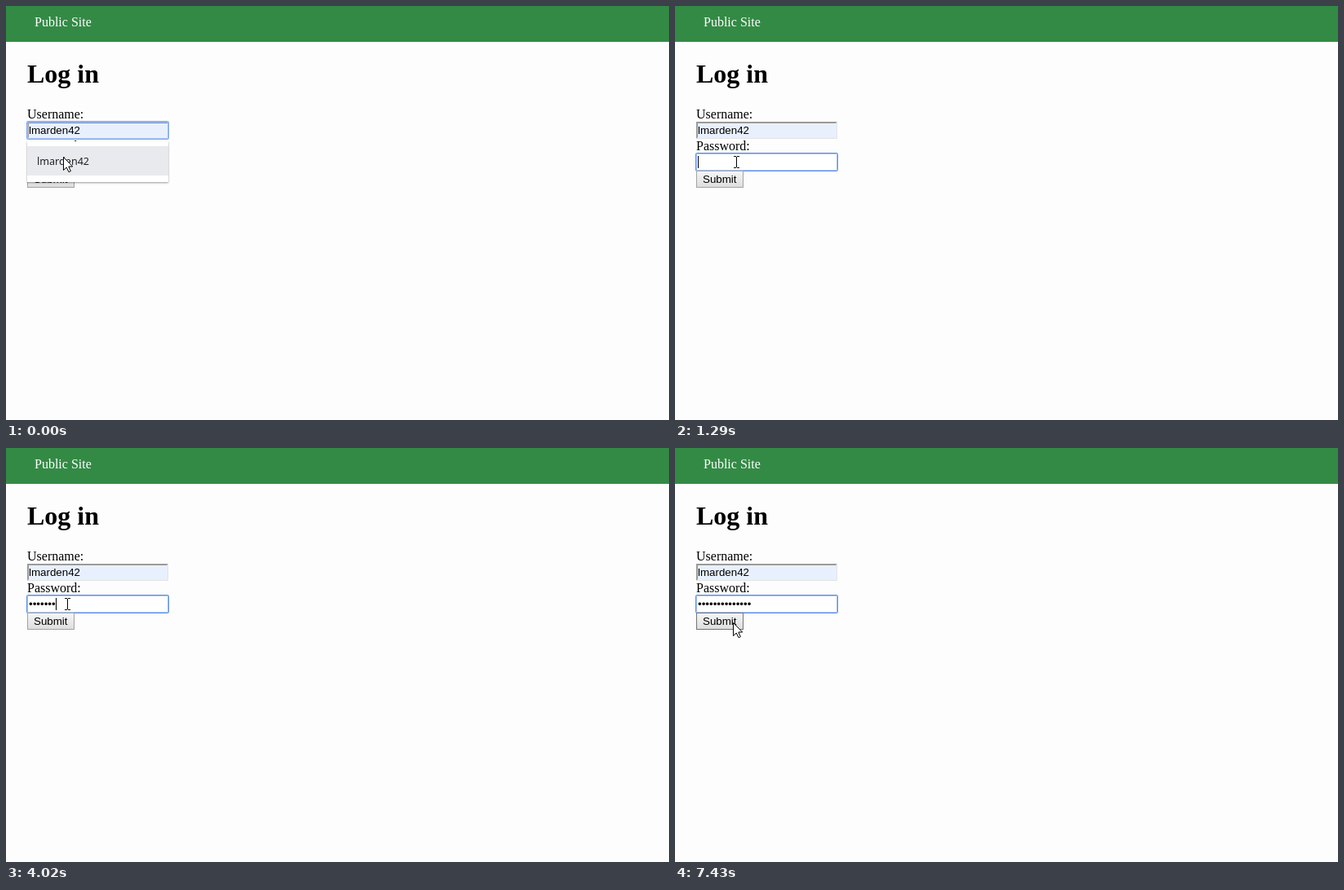
Animation of 813 by 508 pixels, one loop 7.99 s. Source, as an HTML page:

```html
<!DOCTYPE html>
<html lang="en">
<head>
<meta charset="utf-8">
<title>Log in</title>
<style>
html, body { margin: 0; width: 100%; height: 100%; overflow: hidden; background: #fdfdfd; }
svg { display: block; width: 813px; height: 508px; }
text { font: 16px "Liberation Serif", "Times New Roman", serif; white-space: pre; }
.ui { font: 13.333px "Liberation Sans", Arial, sans-serif; }
.ring { fill: none; stroke: #5b8fe3; }
.glow { fill: none; stroke: #a9c4f3; }
</style>
</head>
<body>
<svg viewBox="0 0 813 508">
  <defs>
    <linearGradient id="face" x2="0" y2="1">
      <stop stop-color="#f6f6f6"/><stop offset="1" stop-color="#dddddd"/>
    </linearGradient>
    <filter id="shadow" x="-5%" y="-10%" width="110%" height="125%">
      <feDropShadow dx="0" dy="1" stdDeviation="1" flood-opacity=".4"/>
    </filter>
  </defs>

  <rect width="813" height="508" fill="#fdfdfd"/>
  <rect width="813" height="44" fill="#338a45"/>
  <text x="35" y="25" fill="#fff">Public Site</text>
  <text x="26" y="94" style="font-size:32px;font-weight:bold">Log in</text>
  <text x="26" y="138">Username:</text>
  <text x="26" y="177">Password:</text>

  <!-- username field -->
  <rect x="26" y="142" width="173" height="21" fill="#e8f0fe"/>
  <path d="M26 163V142H199L197 144H28V161Z" fill="#9a9a9a"/>
  <path d="M26 163H199V142L198 143V162H27Z" fill="#e4e4e4"/>
  <g id="userFocus">
    <rect class="glow" x="26.5" y="142.5" width="172" height="20"/>
    <path d="M27 143.5H198" stroke="#7189c9"/>
    <rect class="ring" x="25.5" y="141.5" width="174" height="22" rx="1" style="stroke:#7ba5ea"/>
  </g>
  <text class="ui" x="28" y="157">lmarden42</text>
  <g id="typed">
    <path id="squiggle" fill="none" stroke="#f33"/>
    <rect x="91" y="145" width="1" height="15"/>
  </g>

  <!-- password field -->
  <rect x="26.5" y="181.5" width="172" height="20" fill="#fff" stroke="#a6a6a6"/>
  <g id="passFocus">
    <rect class="glow" x="26.5" y="181.5" width="172" height="20"/>
    <rect class="ring" x="25.5" y="180.5" width="174" height="22" rx="1"/>
  </g>
  <text class="ui" id="dots" x="28" y="196"></text>
  <rect id="caret" y="184" width="1" height="15"/>

  <rect id="button" x="26.5" y="202.5" width="57" height="20" fill="url(#face)" stroke="#a3a3a3"/>
  <text class="ui" x="34" y="217">Submit</text>

  <!-- autofill suggestion -->
  <g id="popup">
    <rect x="26" y="166" width="173" height="50" fill="#fff" filter="url(#shadow)"/>
    <rect x="26" y="172" width="173" height="36" fill="#e8eaed"/>
    <text x="38" y="195" fill="#202124" style="font:12.6px 'Noto Sans','Open Sans',sans-serif">lmarden42</text>
  </g>

  <path id="arrow" d="M.5 .5V16.5L4.2 13L7 18.7L9.4 17.6L6.8 12H11.7Z" fill="#fff" stroke="#000"/>
  <path id="beam" d="M-3 -6.5H0M1 -6.5H4M.5 -6V7M-3 7.5H0M1 7.5H4" fill="none" stroke="#000"/>
</svg>

<script>
const LOOP = 7990;
const KEYS = [2530, 2660, 2810, 2960, 3210, 3460, 4020, 4320, 4850, 4970, 5090, 5400, 5680, 5810];
const CARET_ON = [[1290, 1820], [2380, 6360], [6840, 7430]];
// start time, pointer shape, x, y
const POINTER = [
  [0, 'arrow', 70, 185], [150, 'arrow', 73, 189], [580, 'beam', 75, 191],
  [6360, 'beam', 74, 195], [6480, 'beam', 73, 200], [6600, 'arrow', 72, 206],
  [6720, 'arrow', 72, 211], [6840, 'arrow', 71, 214]
];
const get = id => document.getElementById(id);
const show = (id, on) => get(id).setAttribute('visibility', on ? 'visible' : 'hidden');

let wave = 'M28 159.5';
for (let i = 0; i < 31; i++) wave += i % 2 ? 'l2 2' : 'l2 -2';
get('squiggle').setAttribute('d', wave);

function draw(t) {
  const count = KEYS.filter(k => k <= t).length;
  const [, shape, x, y] = POINTER.filter(p => p[0] <= t).pop();

  show('popup', t < 580);
  show('userFocus', t < 1170);
  show('typed', t >= 580 && t < 1170);
  show('passFocus', t >= 1170);
  show('caret', CARET_ON.some(([a, b]) => t >= a && t < b));
  get('dots').textContent = '•'.repeat(count);
  get('caret').setAttribute('x', 28 + Math.round(count * 14 / 3));
  get('button').setAttribute('stroke', t >= 6600 ? '#757575' : '#a3a3a3');

  for (const id of ['arrow', 'beam']) show(id, id === shape);
  get(shape).setAttribute('transform', `translate(${x} ${y})`);
}

const start = performance.now();
function tick() {
  draw((performance.now() - start) % LOOP);
  requestAnimationFrame(tick);
}
tick();
</script>
</body>
</html>
```
